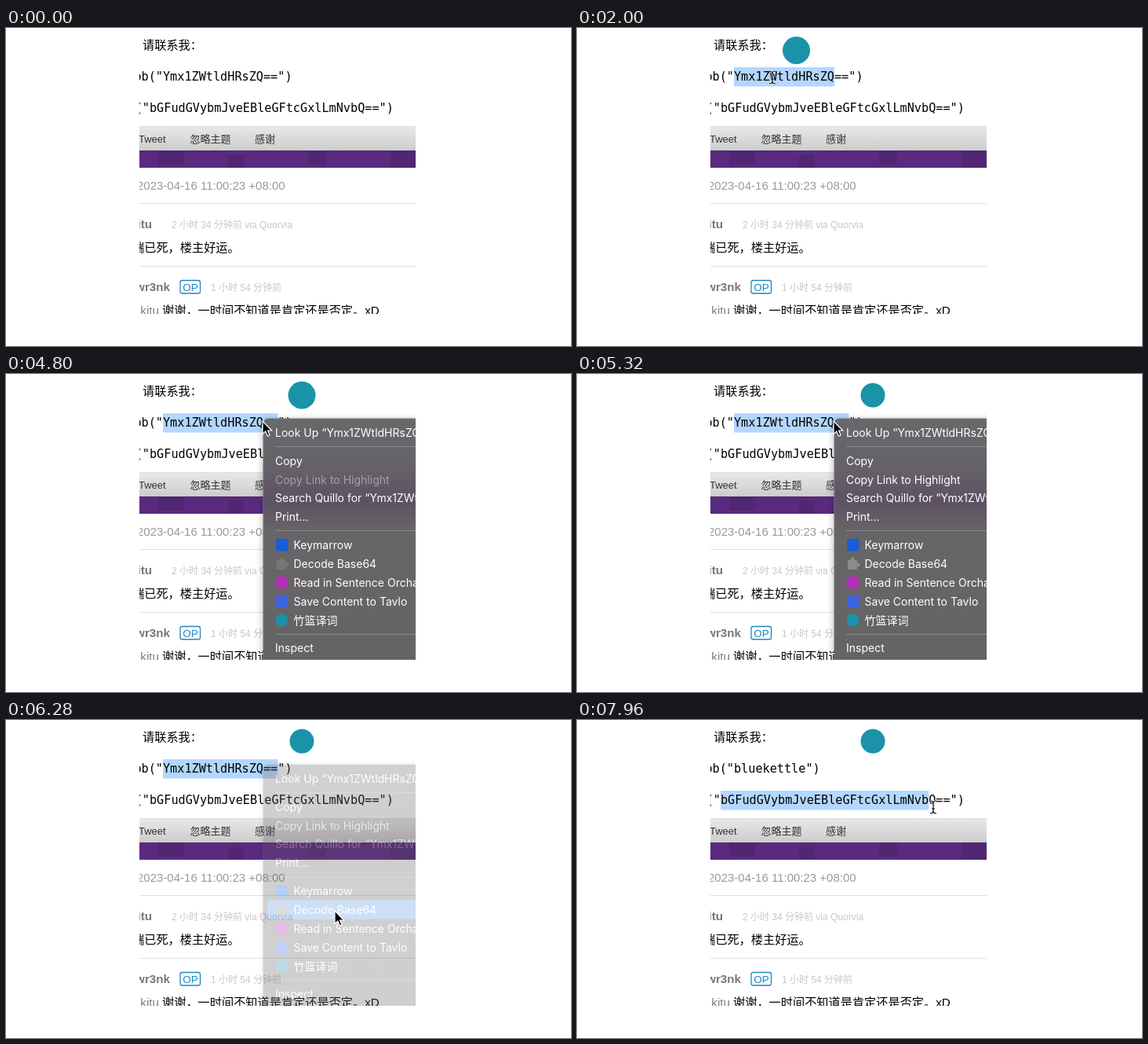
Animation of 720 by 405 pixels, one loop 8000 ms. Source, as an HTML page:

```html
<!DOCTYPE html>
<html lang="zh-CN">
<head>
<meta charset="utf-8">
<style>
html, body { margin: 0; width: 100%; height: 100%; overflow: hidden; background: #fff; }
svg { display: block; width: 720px; height: 405px; }
text { font: 15.2px "Liberation Sans", "Noto Sans CJK SC", "Noto Sans CJK", sans-serif; white-space: pre; }
.code { font: 15.2px "DejaVu Sans Mono", monospace; }
.bar { font-size: 13px; fill: #333; }
.name { font-weight: bold; fill: #777; text-anchor: end; }
.meta { font-size: 12px; fill: #c8c8c8; }
.sel { fill: #b3d7ff; }
#menu { filter: drop-shadow(0 2px 5px rgba(0,0,0,.3)); }
#menu text { font: 14px Inter, "Noto Sans CJK SC", "Noto Sans CJK", sans-serif; fill: #fff; }
</style>
</head>
<body>
<svg viewBox="0 0 720 405">
  <defs>
    <clipPath id="panel"><rect x="170" width="352" height="364"/></clipPath>
    <linearGradient id="barFill" x2="0" y2="1">
      <stop stop-color="#e9e9e9"/><stop offset="1" stop-color="#cccccc"/>
    </linearGradient>
    <linearGradient id="menuFill" x2="0" y2="1">
      <stop stop-color="#68696b"/><stop offset=".2" stop-color="#656168"/>
      <stop offset=".33" stop-color="#5d5164"/><stop offset=".45" stop-color="#686568"/>
      <stop offset="1" stop-color="#646464"/>
    </linearGradient>
  </defs>
  <g clip-path="url(#panel)">
    <text x="174" y="27">请联系我：</text>
    <rect id="sel1" class="sel" x="200" y="50" height="24.5"/>
    <rect id="sel2" class="sel" x="183" y="90" height="24.5"/>
    <text id="line1" class="code" x="163.4" y="67"></text>
    <text id="line2" class="code" x="164.7" y="107"></text>

    <rect x="170" y="125" width="352" height="31" fill="url(#barFill)"/>
    <path d="M170 125.5H522" stroke="#dcdcdc"/>
    <text class="bar" x="169" y="146">Tweet</text>
    <text class="bar" x="234.5" y="146">忽略主题</text>
    <text class="bar" x="317" y="146">感谢</text>
    <rect x="170" y="156" width="352" height="22" fill="#5a2a80"/>
    <path d="M194 157h33v17h-33zM283 161h20v17h-20zM385 157h23v17h-23zM490 156h32v22h-32z" fill="#512672"/>
    <path d="M170 156.5H522" stroke="#4c2569"/>

    <text x="167" y="206" style="font-size:15px" fill="#999">2023-04-16 11:00:23 +08:00</text>
    <path d="M170 223.5H522M170 303.5H522" stroke="#e0e0e0"/>
    <text class="name" x="186" y="255">kitu</text>
    <text class="meta" x="211" y="255">2 小时 34 分钟前 via Quorvia</text>
    <text x="161" y="285">端已死，楼主好运。</text>
    <text class="name" x="209" y="335">wr3nk</text>
    <rect x="222" y="321.5" width="25.5" height="16.5" rx="2.5" fill="none" stroke="#1e87c0" stroke-width="1.3"/>
    <text x="235" y="335" text-anchor="middle" style="font-size:13.5px" fill="#1e87c0">OP</text>
    <text class="meta" x="261" y="335">1 小时 54 分钟前</text>
    <text x="195" y="365" text-anchor="end" fill="#778087">@kitu</text>
    <text x="199" y="365">谢谢，一时间不知道是肯定还是否定。xD</text>

    <circle id="badge" fill="#1a93a8"/>
    <g id="menu">
      <rect x="328" y="57" width="240" height="320" rx="6" fill="url(#menuFill)" stroke="#77757a"/>
      <rect id="hover" x="333" width="225" height="24" rx="4" fill="#5e98e8"/>
      <path d="M343 92.5H552M343 199.5H552M343 331.5H552" stroke="#8b888c"/>
      <rect x="344" y="210" width="15.5" height="15.5" rx="2" fill="#175ddc"/>
      <g id="puzzle">
        <rect x="345" y="237" width="12" height="12" rx="1"/>
        <circle cx="351" cy="236" r="2.5"/><circle cx="358" cy="243" r="2.5"/>
      </g>
      <circle cx="351.5" cy="265.5" r="8.5" fill="#b02fb6"/>
      <rect x="344" y="282" width="15.5" height="15.5" rx="3" fill="#3f62e0"/>
      <circle cx="351.5" cy="313.5" r="8" fill="#1a93a8"/>
    </g>
    <g id="cursor">
      <path id="arrow" d="M0 0V16.5L3.8 13L6.3 19L9 18L6.5 12H11.7Z" stroke="#fff" stroke-width="1.2"/>
      <g id="beam" fill="none">
        <path id="stem" d="M-4-8Q0-8 0-5Q0-8 4-8M0-5V5M-4 8Q0 8 0 5Q0 8 4 8M-2 2H2" stroke-width="1.2"/>
      </g>
    </g>
  </g>
</svg>
<script>
const $ = id => document.getElementById(id);
const LOOP = 8000, STEP = 40, CHAR = 9.15, LAG = 60;
const PLAIN = 'bluekettle', CODED = 'Ymx1ZWtldHRsZQ==';
const MAIL = 'bGFudGVybmJveEBleGFtcGxlLmNvbQ==';

const items = [
  [75, `Look Up “${CODED}”`], [111, 'Copy'], [135, 'Copy Link to Highlight'],
  [158, `Search Quillo for “${CODED}”`], [182, 'Print…'],
  [218, 'Keymarrow', 1], [242, 'Decode Base64', 1], [266, 'Read in Sentence Orchard', 1],
  [290, 'Save Content to Tavlo', 1], [314, '竹篮译词', 1], [349, 'Inspect']
];
const labels = items.map(([y, label, icon]) => {
  const el = document.createElementNS('http://www.w3.org/2000/svg', 'text');
  el.setAttribute('x', icon ? 366.5 : 343);
  el.setAttribute('y', y + 5);
  el.textContent = label;
  return $('menu').appendChild(el);
});

// white halo behind the text cursor
const halo = $('stem').cloneNode();
halo.removeAttribute('id');
halo.setAttribute('stroke', '#fff');
halo.setAttribute('stroke-width', 2.6);
$('stem').before(halo);
$('stem').setAttribute('stroke', '#000');

// time, x, y, and for a drag the downward bow of its path
const path = [
  [520, 446, 364], [1320, 249, 63], [2240, 249, 63], [2960, 203, 61],
  [3360, 203, 61], [4160, 345, 61, 0], [4200, 345, 61], [4440, 327, 60],
  [5440, 327, 60], [6040, 419, 243], [6280, 419, 243], [6720, 213, 45],
  [6880, 197, 33], [7080, 190, 62], [7320, 182, 102], [7520, 182, 102],
  [7960, 454, 111, 14]
];

function cursorAt(t) {
  const i = path.findIndex(k => k[0] > t);
  if (i < 1) return (i ? path[path.length - 1] : path[0]).slice(1, 3);
  const [t0, x0, y0] = path[i - 1], [t1, x1, y1, bow] = path[i];
  const p = (t - t0) / (t1 - t0);
  const e = bow === undefined ? p * p * (3 - 2 * p) : 1 - (1 - p) ** 2.3;
  return [x0 + (x1 - x0) * e, y0 + (y1 - y0) * e + (bow || 0) * Math.sin(Math.PI * p)];
}

const dragged = (t, left) => Math.max(0, Math.round((cursorAt(t - LAG)[0] - left) / CHAR));

function selected(t) {
  if (t >= 1480 && t < 2200) return 14;
  if (t >= 3360 && t < 4240) return dragged(t, 200);
  if (t >= 4240 && t < 6360) return 16;
  return t >= 6360 && t < 7520 ? PLAIN.length : 0;
}

// quick growth past full size, then settling
function pop(age) {
  if (age < 0) return 0;
  if (age < 160) return 17.5 * Math.sin(age / 160 * Math.PI / 2);
  return 15.5 + 2 * Math.max(0, 1 - (age - 160) / 200);
}

const set = (id, attrs) => {
  for (const key in attrs) $(id).setAttribute(key, attrs[key]);
};
const show = (id, on) => { $(id).style.display = on ? '' : 'none'; };

$('line2').textContent = `b("${MAIL}")`.slice(1);

function draw(t) {
  const [x, y] = cursorAt(t);
  $('line1').textContent = `ob("${t < 6360 ? CODED : PLAIN}")`;
  set('sel1', { width: selected(t) * CHAR });
  set('sel2', { width: t >= 7520 ? dragged(t, 183) * CHAR : 0 });

  const first = t < 2200;
  const r = pop(t - (first ? 1840 : 4640));
  set('badge', { cx: first ? 279.5 : 377, cy: first ? 28.5 : 27, r });

  const fade = Math.min(1, Math.max(0, 1 - (t - 6140) / 200));
  const open = t >= 4720 && fade > 0;
  show('menu', open);
  $('menu').style.opacity = fade;
  const ready = t >= 5000;
  labels[2].style.fill = ready ? '' : '#a3a0a4';
  set('puzzle', { fill: ready ? '#8d8b8d' : '#777577' });
  const row = items.find(([c]) => y > 64 && Math.abs(y - c) <= 12);
  show('hover', row);
  if (row) set('hover', { y: row[0] - 12.5 });

  const beam = !open && y >= 50 && y <= 124;
  show('cursor', t >= 520);
  show('beam', beam);
  show('arrow', !beam);
  set('cursor', { transform: `translate(${x.toFixed(2)} ${y.toFixed(2)})` });
}

const start = performance.now();
function tick() {
  const t = (performance.now() - start) % LOOP;
  draw(Math.floor(t / STEP) * STEP);
  requestAnimationFrame(tick);
}
tick();
</script>
</body>
</html>
```
